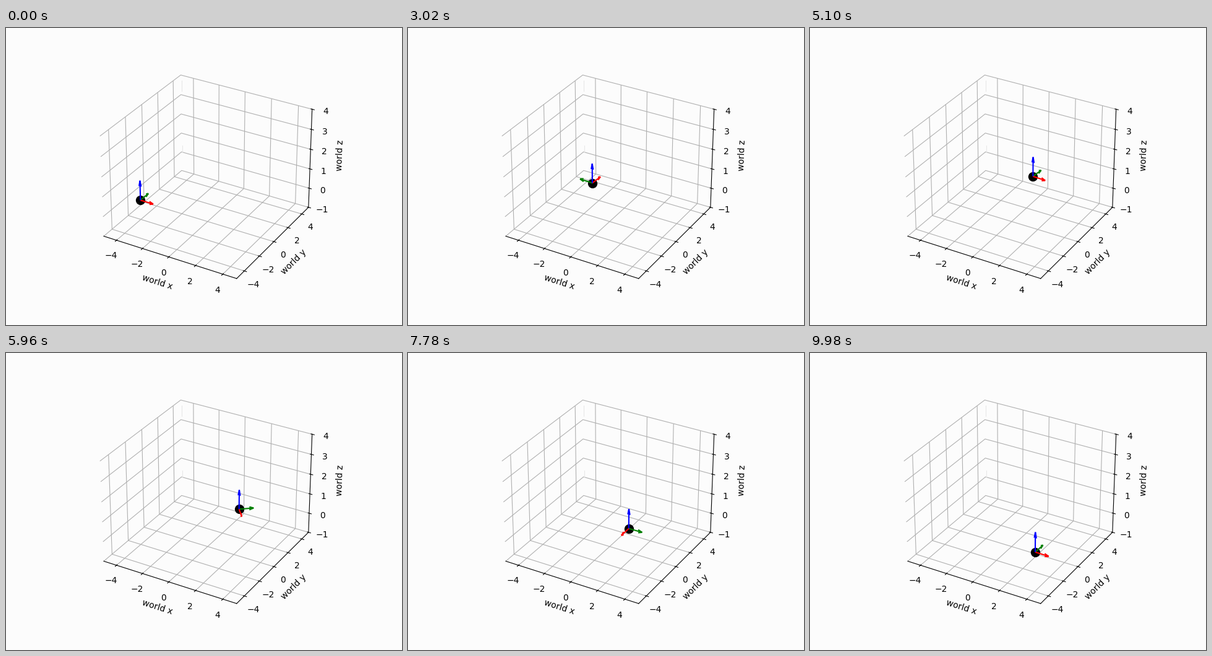
Write a matplotlib script that moves like this. It is 640 px wide and 480 px high and loops after 10000 ms.

```python
import numpy as np
import matplotlib.pyplot as plt
from matplotlib.animation import FuncAnimation
from matplotlib.collections import LineCollection
from matplotlib.lines import Line2D
from mpl_toolkits.mplot3d import proj3d

WIDTH, HEIGHT = 640, 480
FRAMES, STEP_MS = 500, 20
DT = STEP_MS / 1000
SPEED = 1.5
SIDE = 478.8  # side of the square 3D axes in pixels
HEAD, SPREAD = 0.3, np.radians(15)
BACK = "#fcfcfc"

fig = plt.figure(figsize=(WIDTH / 100, HEIGHT / 100), dpi=100, facecolor=BACK)


def build_axes():
    ax = fig.add_axes([80 / WIDTH, 0, SIDE / WIDTH, SIDE / HEIGHT],
                      projection="3d")
    ax.set_box_aspect((4, 4, 3), zoom=0.8)
    ax.set(xlim=(-5, 5), ylim=(-5, 5), zlim=(-1, 4))
    ax.set_xlabel("world x", labelpad=5.6)
    ax.set_ylabel("world y", labelpad=5.6)
    ax.set_zlabel("world z", labelpad=5.6)
    ax.set_xticks(range(-4, 5, 2))
    ax.set_yticks(range(-4, 5, 2))
    ax.set_zticks(range(-1, 5))
    ax.patch.set_visible(False)
    for axis in (ax.xaxis, ax.yaxis, ax.zaxis):
        axis.pane.set_visible(False)
        axis.set_tick_params(pad=4.1)
    return ax


def faint_edge(x, top, bottom):
    fig.add_artist(Line2D([x, x], [HEIGHT - top, HEIGHT - bottom],
                          color="#e6e6e6", lw=0.72, transform=None))


def integrate(start, rate):
    """Forward Euler sums of a rate sampled once per step."""
    return start + np.concatenate([[0], np.cumsum(rate[:-1]) * DT])


def drive():
    """Positions and headings of a vehicle with a cosine turn rate."""
    t = np.arange(FRAMES) * DT
    heading = integrate(0, np.cos(2 * np.pi * t / 10))
    x = integrate(-4, SPEED * np.cos(heading))
    y = integrate(-2, SPEED * np.sin(heading))
    return x, y, heading


# The grid never changes, so it is drawn once and kept as a backdrop.
ax = build_axes()
faint_edge(283.5, 85, 102)
faint_edge(284.5, 190, 201)
fig.canvas.draw()
backdrop = np.array(fig.canvas.buffer_rgba())
view = ax.get_proj()
to_pixels = ax.transData.frozen()
fig.clear()
fig.figimage(backdrop, origin="upper", zorder=0)

xs, ys, headings = drive()
dot = fig.add_artist(Line2D([0], [0], marker="o", ms=10, color="black",
                            ls="none", transform=None, zorder=2))
arrows = [fig.add_artist(LineCollection([], colors=color, linewidths=1.5,
                                        transform=None))
          for color in ("r", "g", "b")]


def project(points):
    px, py, depth = proj3d.proj_transform(*np.transpose(points), view)
    return to_pixels.transform(np.column_stack([px, py])), depth


def arrow_points(tail, axis, side):
    """Tail, tip and the two barb ends of a unit arrow."""
    tip = tail + axis
    along, across = np.cos(SPREAD) * axis, np.sin(SPREAD) * side
    return [tail, tip, tip - HEAD * (along + across),
            tip - HEAD * (along - across)]


def update(i):
    c, s = np.cos(headings[i]), np.sin(headings[i])
    origin = np.array([xs[i], ys[i], 0.0])
    east, up = np.array([1.0, 0, 0]), np.array([0, 0, 1.0])
    frame = ((np.array([c, s, 0]), up), (np.array([-s, c, 0]), up), (up, east))
    for arrow, (axis, side) in zip(arrows, frame):
        (tail, tip, left, right), depth = project(
            arrow_points(origin, axis, side))
        arrow.set_segments([[tail, tip], [tip, left], [tip, right]])
        arrow.set_zorder(4 - min(depth))
    dot.set_data([tail[0]], [tail[1]])
    return [dot, *arrows]


anim = FuncAnimation(fig, update, frames=FRAMES, interval=STEP_MS,
                     repeat=True, repeat_delay=0, blit=False)
plt.show()
```
